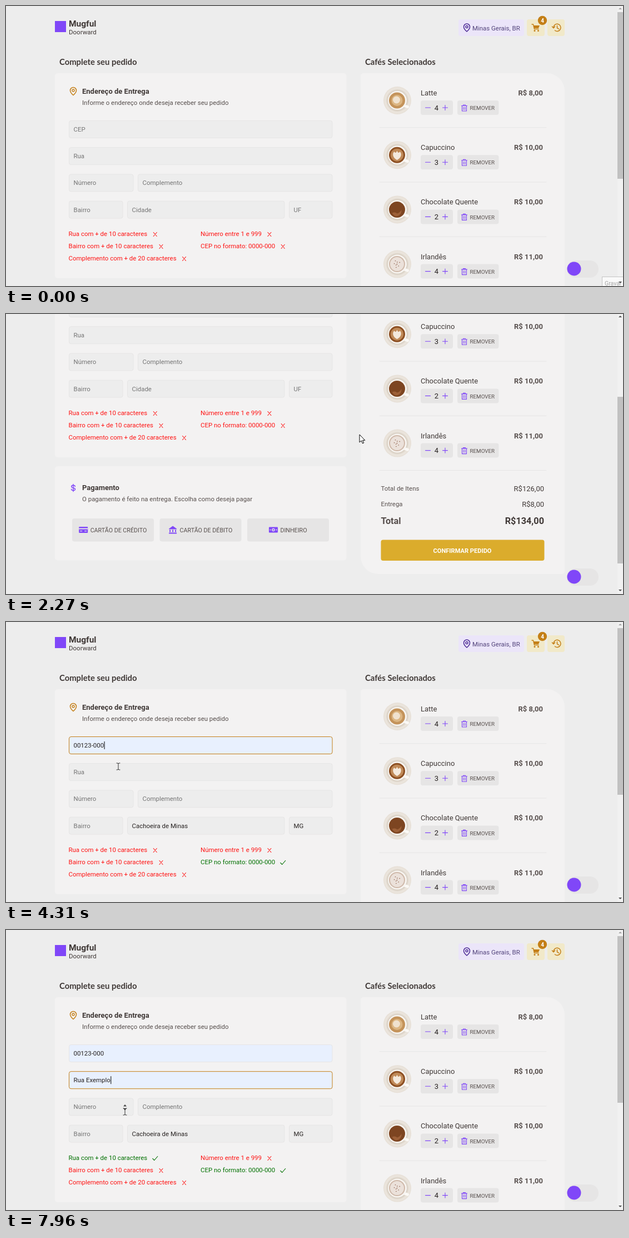
An HTML page for the animation above (8 s loop, 1110 by 504 pixels).

```html
<!DOCTYPE html>
<html lang="pt-BR">
<head>
<meta charset="utf-8">
<title>Complete seu pedido</title>
<style>
html, body { margin: 0; width: 100%; height: 100%; overflow: hidden; background: #ededed; }
svg { display: block; width: 1110px; height: 504px; font: 11.45px Roboto, Arial, sans-serif; }
.head { font: 700 14.85px Lato, "Open Sans", sans-serif; }
.bold { font-weight: 700; }
.mid { font-size: 13px; }
.line { fill: none; stroke-linecap: round; stroke-linejoin: round; }
</style>
</head>
<body>
<svg id="stage" viewBox="0 0 1110 504"></svg>
<script>
const LOOP = 8000, FRAME = 67.6, PHASE = 45;
const C = {
  page: '#ededed', card: '#f3f2f2', button: '#e6e5e5', text: '#574f4d', sub: '#403937', title: '#272221',
  hint: '#757575', purple: '#8047f8', deep: '#4b2995', place: '#51427a', lilac: '#ebe5f9', gold: '#dbac2c',
  amber: '#c47f17', cream: '#f1e9c9', fill: '#e8f0fe', bad: '#ff1414', good: '#007000'
};
const ZIP = '00123-000', STREET = 'Rua Exemplo';

// ---- drawing helpers
const pen = document.createElement('canvas').getContext('2d');
const width = (s, size = 11.45) => {
  pen.font = size + 'px Roboto, Arial, sans-serif';
  return pen.measureText(s).width;
};
const rect = (x, y, w, h, fill, r = 4, more = '') =>
  `<rect x="${x}" y="${y}" width="${w}" height="${h}" rx="${r}" fill="${fill}" ${more}/>`;
const text = (x, y, s, fill = C.text, more = '') => `<text x="${x}" y="${y}" fill="${fill}" ${more}>${s}</text>`;
const line = (d, color, w = 1.2, more = '') => `<path class="line" d="${d}" stroke="${color}" stroke-width="${w}" ${more}/>`;
const shape = (d, fill, more = '') => `<path d="${d}" fill="${fill}" ${more}/>`;
const disc = (x, y, r, fill) => `<circle cx="${x}" cy="${y}" r="${r}" fill="${fill}"/>`;
const at = (x, y, s) => `<g transform="translate(${x} ${y})">${s}</g>`;
const loop = (n, f) => Array.from({ length: n }, (_, i) => f(i)).join('');
const MID = 'class="mid"', BIG = 'class="mid bold"', END = 'text-anchor="end"', CENTER = 'text-anchor="middle"';

const pin = (x, y, color) => at(x, y,
  line('M0 7C-3.5 4-5.5 1.3-5.5-1.5A5.5 5.5 0 0 1 5.5-1.5C5.5 1.3 3.5 4 0 7Z', color, 1.5) +
  `<circle cy="-1.5" r="2" fill="none" stroke="${color}" stroke-width="1.4"/>`);

function header() {
  const trolley = line('M-7-6H-4.5L-2.5 2.5H5', C.amber, 1.4) + shape('M-4-4H7L5 1H-3Z', C.amber) +
    disc(-2, 5.5, 1.5, C.amber) + disc(4.5, 5.5, 1.5, C.amber);
  const clock = line('M-6 0A6.5 6.5 0 1 1-3.5 5M-8.5-2L-6 .8L-3.5-2M.5-3.5V.5L3.5 2.3', C.amber, 1.5);
  return rect(88, 27, 20, 20, C.purple, 0) +
    text(113, 37, 'Mugful', C.sub, 'class="bold" font-size="15.5"') +
    text(113, 51, 'Doorward', C.sub, 'font-size="11.5"') +
    rect(814, 24, 118, 30, C.lilac) + pin(829, 39, C.deep) + text(839, 43.5, 'Minas Gerais, BR', C.place) +
    rect(937, 24, 32, 30, C.cream) + at(953, 39, trolley) +
    disc(965, 26, 8.2, C.amber) + text(965, 29.7, '4', '#fff', 'class="bold" font-size="10" ' + CENTER) +
    rect(974, 24, 31, 30, C.cream) + at(991, 39, clock) +
    text(96, 105.5, 'Complete seu pedido', C.sub, 'class="head"') +
    text(646, 105.5, 'Cafés Selecionados', C.sub, 'class="head"');
}

// ---- form
const rows = [
  { CEP: 474 }, { Rua: 474 }, { Número: 116, Complemento: 350 }, { Bairro: 97, Cidade: 283, UF: 78 }
];
const fields = rows.flatMap((row, i) => {
  let x = 113;
  return Object.entries(row).map(([name, w]) => {
    const f = { name, x, y: 206 + 48.2 * i, w };
    x += w + 8;
    return f;
  });
});
const field = ({ name, x, y, w }) =>
  rect(x + .5, y + .5, w - .5, 31, C.page, 3.5, `id="${name}" stroke="${C.button}"`) +
  text(x + 8.5, y + 20, name, C.hint, `id="${name}Text"`);

const CROSS = 'M-3-3.5L3 3.5M3-3.5L-3 3.5', CHECK = 'M-4.5 .3L-1.5 3.5L4.5-3.5';
const rules = ['Rua com + de 10 caracteres', 'Bairro com + de 10 caracteres', 'Complemento com + de 20 caracteres',
  'Número entre 1 e 999', 'CEP no formato: 0000-000'];
function rule(s, i) {
  const x = i < 3 ? 112.5 : 350, y = 414 + 22 * (i % 3);
  return text(x, y, s, C.bad, `id="rule${i}"`) +
    at(x + width(s) + 14, y - 3, line(CROSS, C.bad, 1.1, `id="mark${i}"`));
}

const popup = (id, y, s) => `<g id="${id}">` + rect(112, y, 160, 43, '#fff', 4, 'filter="url(#soft)"') +
  rect(112, y + 6, 160, 31, '#ececec', 0, `id="${id}Row"`) + text(121.5, y + 25.5, s, C.title) + '</g>';

const form = () =>
  rect(88, 121, 524.5, 369, C.card, 5) + pin(121, 153.5, C.amber) +
  text(137, 158, 'Endereço de Entrega', C.sub, BIG) +
  text(137, 177.5, 'Informe o endereço onde deseja receber seu pedido') +
  fields.map(field).join('') + rules.map(rule).join('') +
  shape('M211 317.5L214 314L217 317.5ZM211 321L214 324.5L217 321Z', '#444', 'id="spin"') +
  rect(0, 0, 1, 14, '#000', 0, 'id="caret"') +
  popup('popCep', 240, ZIP) + popup('popRua', 288.5, STREET);

function payment() {
  const p = C.purple, b = C.button;
  const kinds = {
    'CARTÃO DE CRÉDITO': rect(-8, -5.5, 16, 11, p, 1) + shape('M-8-3H8V-1H-8ZM-6 1.5H-2V2.7H-6ZM2 1.5H6V2.7H2Z', b),
    'CARTÃO DE DÉBITO': shape('M-7-2L0-7L7-2V-1H-7ZM-6 0H-4V4H-6ZM-1 0H1V4H-1ZM4 0H6V4H4ZM-7 5H7V7H-7Z', p),
    'DINHEIRO': rect(-8, -5, 16, 10, p, 1) + disc(0, 0, 2.8, b) + disc(0, 0, 1.3, p) + disc(-5.5, 0, 1, b) + disc(5.5, 0, 1, b)
  };
  const button = ([s, icon], i) => {
    const x = 119 + 157.5 * i, mid = x + 83.5;
    return rect(x, 600, 147, 41.5, b) + at(mid - width(s, 10.7) / 2 - 12.5, 620.5, icon) +
      text(mid, 624.5, s, C.text, 'font-size="10.7" ' + CENTER);
  };
  return rect(88, 506, 524.5, 169.5, C.card, 5) +
    at(121, 545, line('M3.3-2.5C3-5.5-3.3-5.5-3.3-2.3C-3.3 .8 3.5-.8 3.5 2.4C3.5 5.5-3.3 5.5-3.5 2.3M0-6.5V6.5', p, 1.4)) +
    text(137, 549, 'Pagamento', C.sub, BIG) +
    text(137, 568.5, 'O pagamento é feito na entrega. Escolha como deseja pagar') +
    Object.entries(kinds).map(button).join('');
}

// ---- cart
const speck = i => disc(5 * Math.cos(2.4 * i) * Math.sqrt(i / 4), 5 * Math.sin(2.4 * i) * Math.sqrt(i / 4), .8, '#8a5a48');
const coffees = [
  ['Latte', 4, 8, '#c4935a', disc(0, 0, 10, '#dcb683') + disc(-1, -1, 6.5, '#f0e2cf')],
  ['Capuccino', 3, 10, '#8c4f22', disc(0, 0, 11.5, '#c08a58') +
    shape('M0 9C-8 5-9-3-5-6C-3-3-1-4 0-8C1-4 3-3 5-6C9-3 8 5 0 9Z', '#f4e9dc')],
  ['Chocolate Quente', 2, 10, '#7d4521', shape('M-9 6Q-3 4 0 7Q5 6 8 0Q9 9 0 12Q-6 12-9 6Z', '#9d6038')],
  ['Irlandês', 4, 11, '#cfb9aa', disc(0, 0, 12.5, '#ebe1da') + loop(8, speck)]
];
const cup = (brew, art) => disc(0, 0, 25, 'url(#plate)') + line('M11 9L18.500 11.500', '#faf8f5', 5) +
  disc(0, 0, 17, '#f8f5f1') + at(-.5, 0, disc(0, 0, 14.5, brew) + art);

function item([name, n, price, brew, art], i) {
  const trash = line('M-5-4H5M-2-4V-5.5H2V-4M-4-4V5.5H4V-4M-1.4-1.5V3M1.4-1.5V3', C.purple, 1.1);
  return at(0, 98.2 * i,
    at(704, 170, cup(brew, art)) + text(746, 161, name, C.sub, MID) +
    text(966, 161, `R$ ${price},00`, C.text, BIG + ' ' + END) +
    rect(746, 170, 58, 26, C.button) + line('M754.5 183H763.5M785.5 183H794.5M790 178.5V187.5', C.purple, 1.1) +
    text(774.5, 187.5, n, C.title, MID + ' ' + CENTER) +
    rect(812, 170, 74.5, 26, C.button) + at(824.5, 183.5, trash) + text(834.5, 187.3, 'REMOVER', C.text, 'font-size="9.8"') +
    line('M672 218.8H972', C.button, 1));
}

function cart() {
  const goods = coffees.reduce((sum, [, n, price]) => sum + n * price, 0), fee = 8;
  const pair = (y, name, cost, look, more) =>
    text(674.5, y, name, C.text, look) + text(968, y + .5, `R$${cost},00`, C.sub, more + ' ' + END);
  const total = 'class="bold" font-size="16.25"';
  return shape('M643 121H973A32 32 0 0 1 1005 153V695A5 5 0 0 1 1000 700H670A32 32 0 0 1 638 668V126A5 5 0 0 1 643 121Z', C.card) +
    coffees.map(item).join('') +
    pair(550, 'Total de Itens', goods, '', MID) + pair(578, 'Entrega', fee, '', MID) +
    pair(609.5, 'Total', goods + fee, total, total) +
    rect(674.5, 638.5, 294, 37.5, C.gold) +
    text(821, 661.5, 'CONFIRMAR PEDIDO', '#fff', 'class="bold" font-size="11.1" ' + CENTER);
}

const DOWN = shape('M1102 496L1105 499L1108 496Z', '#505050');
const chrome = () =>
  rect(1009, 458, 57, 31, C.button, 15.5) + disc(1022, 473, 12.5, C.purple) +
  rect(1100, 0, 10, 504, '#f1f1f1', 0) + rect(1100, 11, 10, 300, '#c1c1c1', 0, 'id="thumb"') +
  shape('M1102 6L1105 3L1108 6Z', '#505050', 'id="up"') + DOWN +
  '<g id="tip">' + rect(1072.5, 487.5, 45, 25, '#f9f9f9', 0, 'stroke="#c4c4c4"') +
  text(1077, 502.5, 'Gravar', '#a5a5a5', 'font-size="10.5"') + DOWN + '</g>' +
  '<g id="mouse">' + shape('M0 0V14L3.3 11L5.5 16L7.7 15L5.5 10.3H9.8Z', '#fff', 'id="arrow" stroke="#000"') +
  line('M-3-6H-1L0-5L1-6H3M0-5V5M-3 6H-1L0 5L1 6H3', '#333', 1, 'id="beam"') + '</g>';

document.getElementById('stage').innerHTML =
  '<defs><radialGradient id="plate"><stop offset=".7" stop-color="#d8cfc3"/><stop offset=".85" stop-color="#ece6de"/>' +
  '<stop offset="1" stop-color="#e6dfd6"/></radialGradient>' +
  '<filter id="soft"><feDropShadow dx="0" dy="0" stdDeviation=".8" flood-opacity=".35"/></filter></defs>' +
  '<g id="sheet">' + header() + form() + payment() + cart() + '</g>' + chrome();

// ---- timeline
const el = {};
document.querySelectorAll('[id]').forEach(e => el[e.id] = e);
const set = (id, attrs) => { for (const k in attrs) el[id].setAttribute(k, attrs[k]); };
const show = (id, on) => set(id, { visibility: on ? 'inherit' : 'hidden' });

// moves: start, end, then the place reached
const scrolls = [[1080, 1662, 306], [2000, 2650, 0]];
const glides = [
  [520, 920, 598, 47], [1700, 2000, 636, 217], [2750, 3150, 260, 234], [3300, 3600, 202, 260], [4710, 5400, 240, 386],
  [5500, 6330, 548, 388], [6400, 6730, 325, 331], [6750, 7080, 214, 273], [7150, 7350, 214, 327]
];
function follow(moves, from, t) {
  return moves.reduce((pos, [a, b, ...to]) => {
    const p = Math.min(1, Math.max(0, (t - a) / (b - a))), e = p * p * (3 - 2 * p);
    return pos.map((v, i) => v + (to[i] - v) * e);
  }, from).map(Math.round);
}

// form events
const T = {
  cep: { focus: 3300, list: 3370, hover: 3540, pick: 4030, blur: 5340 },
  rua: { focus: 7070, list: 7140, hover: 7280, pick: 7600, blur: LOOP }
};
const CLOSE = 70, VERIFY = 60, LOOKUP = 200, BLINK = 520;

function input(name, value, focus, blue) {
  set(name, { fill: blue ? C.fill : C.page, stroke: focus ? C.amber : C.button });
  el[name + 'Text'].textContent = value || name;
  set(name + 'Text', { fill: value ? C.title : C.hint });
}
function valid(i, ok) {
  const color = ok ? C.good : C.bad;
  set('rule' + i, { fill: color });
  set('mark' + i, { stroke: color, d: ok ? CHECK : CROSS });
}
function fillIn(t, name, e, value, pop, ruleNo) {
  const focus = t >= e.focus && t < e.blur, picked = t >= e.pick, hover = t >= e.hover;
  const open = t >= e.list && t < e.pick + CLOSE;
  input(name, hover ? value : '', focus, hover);
  show(pop, open);
  show(pop + 'Row', open && hover);
  valid(ruleNo, t >= e.pick + VERIFY);
  if (focus) {
    const since = t - (picked ? e.pick : e.focus);
    show('caret', Math.floor(since / BLINK) % 2 === 0 || (picked && since < 680));
    set('caret', { x: 122 + (picked ? width(value) : 0), y: fields.find(f => f.name === name).y + 9 });
  }
  return open;
}

function draw(now) {
  const t = Math.max(0, Math.floor((now % LOOP - PHASE) / FRAME) * FRAME + PHASE);
  const [y] = follow(scrolls, [0], t);
  set('sheet', { transform: `translate(0 ${-y})` });
  set('thumb', { y: 11 + y * .595 });
  set('up', { fill: y ? '#505050' : '#a3a3a3' });
  show('tip', t < PHASE);

  show('caret', false);
  const cepOpen = fillIn(t, 'CEP', T.cep, ZIP, 'popCep', 4);
  const ruaOpen = fillIn(t, 'Rua', T.rua, STREET, 'popRua', 0);
  const found = t >= T.cep.pick + LOOKUP;
  input('Cidade', found ? 'Cachoeira de Minas' : '');
  input('UF', found ? 'MG' : '');

  const [mx, my] = follow(glides, [1092, 486], t), page = my + y;
  const over = !cepOpen && !ruaOpen && fields.find(f => mx > f.x && mx < f.x + f.w && page > f.y && page < f.y + 28.4);
  const seen = t >= 510;
  show('arrow', seen && !over);
  show('beam', seen && over);
  show('spin', over && over.name === 'Número');
  set('mouse', { transform: `translate(${mx} ${my})` });
}

const start = performance.now();
function tick() {
  draw(performance.now() - start);
  requestAnimationFrame(tick);
}
tick();
</script>
</body>
</html>
```
